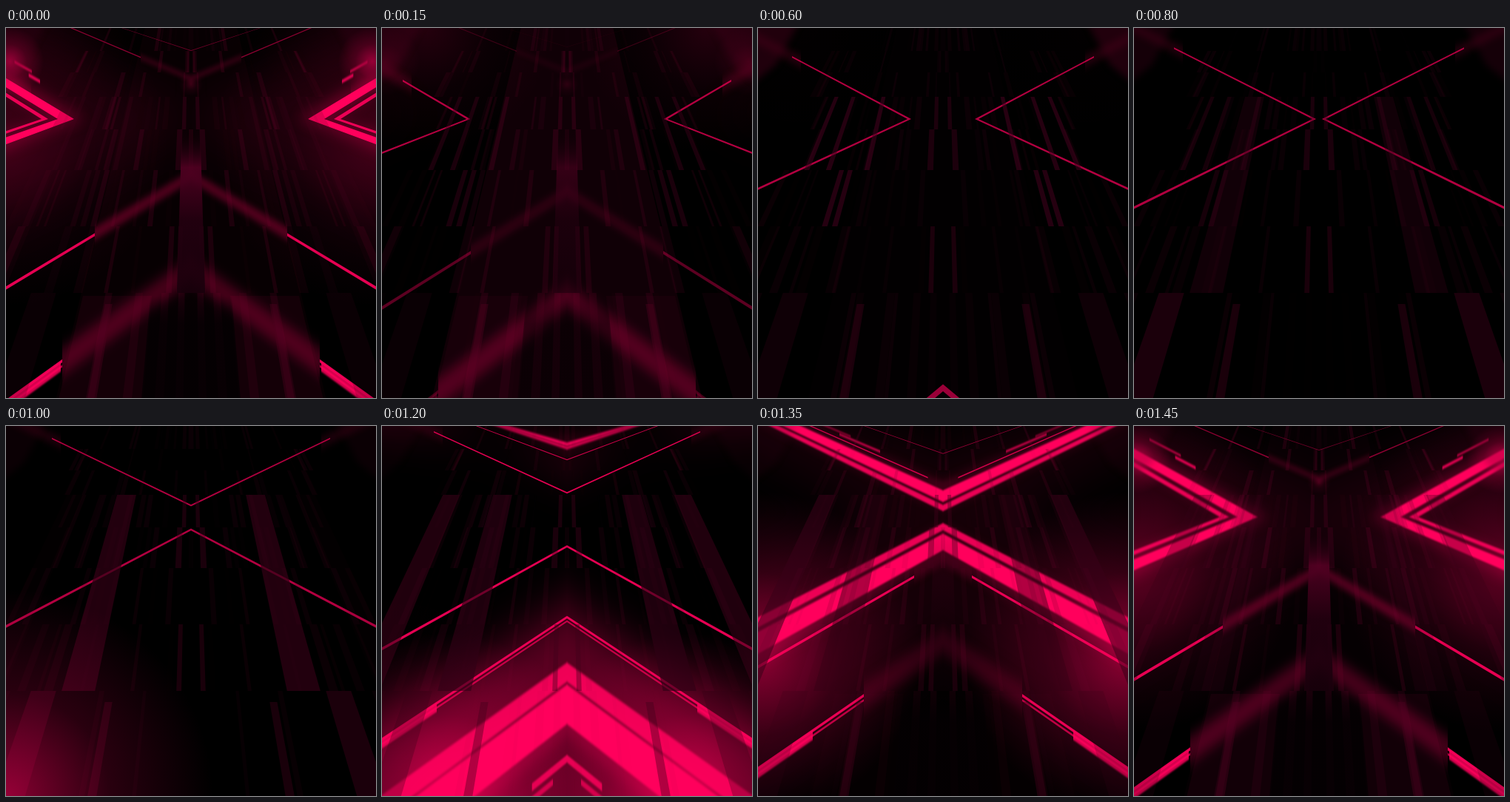
An HTML page with a canvas that plays this animation: 500x500 px, repeating every 1.5 s.

```html
<!DOCTYPE html>
<html>
<head>
<meta charset="utf-8">
<style>
html, body { margin: 0; width: 100%; height: 100%; overflow: hidden; background: #000; }
canvas { display: block; width: 100%; height: 100%; }
</style>
</head>
<body>
<canvas id="stage" width="500" height="500"></canvas>
<script>
const c = document.getElementById('stage').getContext('2d');
const LOOP = 1500, STEP = 50, HORIZON = 123, VANISH = -260, MID = 250;

const clamp = v => Math.max(0, Math.min(1, v));
const ramp = (a, b, t) => clamp((t - a) / (b - a));
const red = a => `rgba(255,0,92,${clamp(a)})`;

// Soft hump around a moment of the loop
function bump(t, peak, reach) {
  const d = Math.abs((t - peak + LOOP * 1.5) % LOOP - LOOP / 2);
  const k = clamp(1 - d / reach);
  return k * k * (3 - 2 * k);
}

// Every chevron has its tip on the horizon; its arms steepen with the tip's place
const floorSlope = a => .37 + .155 * (a - 90) / 195;
const roofSlope = a => .6 - .12 * (a - 90) / 195;
const floorY = (a, x) => HORIZON + (a - x) * floorSlope(a);
const roofY = (a, x) => HORIZON - (a - x) * roofSlope(a);

function poly(...pts) {
  c.beginPath();
  for (const [x, y] of pts) c.lineTo(x, y);
  c.closePath();
  c.fill();
}

// Band between two chevrons, limited to a side and to a range of x
function chevron(a0, a1, alpha, { side = 'both', blur = 0, from = -100, to = MID } = {}) {
  if (alpha < .01 || to <= from) return;
  c.save();
  c.beginPath();
  c.rect(from, side === 'floor' ? HORIZON : -100, to - from, side === 'both' ? 700 : side === 'floor' ? 477 : HORIZON + 100);
  c.clip();
  if (blur) c.filter = `blur(${blur}px)`;
  c.fillStyle = red(alpha);
  const x = -100;
  poly([a1, HORIZON], [x, floorY(a1, x)], [x, floorY(a0, x)],
    [a0, HORIZON], [x, roofY(a0, x)], [x, roofY(a1, x)]);
  c.restore();
}

function glow(x, y, r, alpha) {
  if (alpha < .01) return;
  const g = c.createRadialGradient(x, y, 0, x, y, r);
  g.addColorStop(0, red(alpha));
  g.addColorStop(.5, red(alpha * .3));
  g.addColorStop(1, red(0));
  c.fillStyle = g;
  c.fillRect(0, 0, 500, 500);
}

// A tile on a plane that runs to the vanishing point
function tile(u0, u1, y0, y1) {
  const x = (u, y) => MID - u * (y - VANISH);
  poly([x(u1, y0), y0], [x(u0, y0), y0], [x(u0, y1), y1], [x(u1, y1), y1]);
}

let seed = 11;
const rnd = () => (seed = seed * 16807 % 2147483647) / 2147483647;
const ROWS = [0, 31, 60, 93, 137, 192, 268, 358, 500];
const specks = [];
for (let i = 0; i < ROWS.length - 1; i++) {
  for (let n = 0; n < 10; n++) {
    specks.push({ u: rnd() * .5, w: .006 + rnd() * .014, y0: ROWS[i], y1: ROWS[i + 1], phase: rnd() });
  }
}

// Thin chevron that drifts towards the viewer for a whole loop, then fades
function drift(t) {
  const a = 90 + .195 * t;
  const out = 1 - ramp(LOOP, 1750, t);
  const settled = ramp(1320, 1420, t);
  const bright = (.7 + .2 * ramp(1000, 1200, t)) * out;
  const from = (22 + .04 * t) * (1 - settled);
  const floorEnd = MID - 130 * settled, roofEnd = MID - 68 * settled;
  chevron(a - 5, a, bright, { side: 'floor', to: floorEnd, blur: .5 });
  chevron(a - 14, a + 6, .3 * settled * out, { side: 'floor', from: floorEnd, blur: 4 });
  chevron(a - 5, a, bright * (1 - .4 * settled), { side: 'roof', from, to: roofEnd, blur: .5 });
  chevron(a - 12, a + 6, .22 * settled * out, { side: 'roof', from: roofEnd, blur: 3 });
  chevron(a - 14, a + 10, .2 * out * (1 - settled), { side: 'roof', to: from + 12, blur: 6 });
}

// Nearer pair of chevrons
function nearPair(p) {
  const a = 457 + .25 * (p - 1200);
  const settled = ramp(1270, 1400, p);
  const shown = ramp(1120, 1200, p) * (1 - ramp(1550, 1680, p));
  const back = .6 * bump(p, 2100, 150);
  const end = MID - 174 * settled;
  chevron(a - 4, a, shown * .9, { side: 'floor', to: end, blur: .5 });
  chevron(a + 3, a + 6, shown * .7, { side: 'floor', to: end });
  chevron(a - 2, a + 10, shown * .85, { side: 'floor', to: 74, blur: 1 });
  chevron(a - 18, a + 16, .26 * settled * (1 - ramp(1750, 2050, p)), { side: 'floor', from: end, blur: 8 });
  chevron(a - 4, a + 4, back, { side: 'floor', blur: .6 });
  chevron(a - 3, a + 2, shown * (.8 - .4 * settled), { side: 'roof', blur: .6 });
}

// Wide bright chevron that races away into the distance
function pulse(p) {
  const left = LOOP - p;
  const a = 92 + 1.45 * left + .0009 * left * left;
  const out = 1 - ramp(LOOP, 1720, p);
  const power = ramp(1080, 1200, p) * out;
  if (!power) return;
  const inner = a - 22 - .1 * left;
  const second = inner - 13 + .03 * left;
  const blur = .7 + .003 * Math.max(0, left);

  chevron(a - 170, a + 170, power * (.08 + .33 * ramp(200, 320, left)), { blur: 32 });
  const foot = Math.max(0, a - 377 / floorSlope(a));
  glow(foot * .7, Math.min(500, floorY(a, 0)), 220, power * Math.min(.7, .2 + .0022 * left));

  chevron(inner - 12, a + 14, power * .25, { blur: 9 });
  chevron(inner, a, power, { blur });
  chevron(second - 9 - .06 * left, second, power * .9, { blur });

  // Short strands ahead of the tip
  const side = left > 250 ? 'floor' : 'roof';
  chevron(a + 38, a + 47, power * .85, { side, from: a / 3, to: a / 2, blur: 1 });
  chevron(a + 53, a + 60, power * .7, { side, from: a / 8, to: a * .38, blur: 1 });
  glow(5, 45, 46, .65 * ramp(1390, 1450, p) * out);
}

function tiles(t, p) {
  const late = ramp(1330, 1430, p) * (1 - ramp(LOOP, 1900, p));
  const pillar = ramp(0, 480, 480 - Math.abs(t - 1080));

  for (const s of specks) {
    const wave = .5 + .5 * Math.cos(2 * Math.PI * (t / LOOP + s.phase));
    c.fillStyle = `rgba(120,0,50,${(.09 + .1 * late + .1 * bump(t, 1300, 200)) * wave})`;
    tile(s.u, s.u + s.w, s.y0, s.y1);
  }

  // Pillars, inner and outer
  c.fillStyle = `rgba(48,0,21,${pillar * .85})`;
  tile(.21, .283, 93, 358);
  c.fillStyle = `rgba(56,0,24,${.65 * bump(t, 1270, 330)})`;
  tile(.41, .475, 93, 358);
  c.fillStyle = `rgba(50,0,21,${.2 + .4 * bump(t, 900, 450)})`;
  tile(.295, .35, 358, 500);

  // Streaks beside the axis and on the walls
  c.fillStyle = 'rgba(64,0,27,.4)';
  tile(.017, .031, 93, 137);
  tile(.029, .047, 137, 192);
  tile(.021, .032, 268, 358);
  tile(.168, .184, 373, 500);
  c.fillStyle = `rgba(66,0,28,${.15 + .5 * bump(t, 450, 600)})`;
  for (const u of [.27, .296]) tile(u, u + .014, 192, 268);
  for (const u of [.22, .335, .4]) tile(u, u + .015, 93, 192);

  // Central strip
  c.fillStyle = red(.07 * bump(t, 250, 450));
  tile(0, .24, 0, 500);
  c.fillStyle = red(.05 * late);
  tile(.085, .235, 362, 500);

  // Column on the axis with a soft light in it
  const g = c.createLinearGradient(0, 140, 0, 360);
  g.addColorStop(0, `rgba(20,0,9,0)`);
  g.addColorStop(.22, `rgba(82,0,34,${.9 * late})`);
  g.addColorStop(.55, `rgba(36,0,16,${.9 * late})`);
  g.addColorStop(1, `rgba(24,0,11,${.9 * late})`);
  c.fillStyle = g;
  tile(0, .031, 140, 358);
  glow(MID, 76, 16, .2 * late);

  const dark = .8 * ramp(1230, 1300, p) * (1 - ramp(LOOP, 1800, p));
  const shade = c.createLinearGradient(0, 362, 0, 400);
  shade.addColorStop(0, 'rgba(4,0,2,0)');
  shade.addColorStop(1, `rgba(4,0,2,${dark})`);
  c.fillStyle = shade;
  tile(0, .088, 362, 500);

  // Shaded upper corner
  c.save();
  c.filter = 'blur(5px)';
  c.fillStyle = `rgba(70,0,28,${.12 + .4 * bump(t, 430, 700)})`;
  poly([-20, -20], [62, -20], [24, 50], [-20, 85]);
  c.restore();
}

function half(t) {
  const p = t < 750 ? t + LOOP : t;
  c.save();
  c.beginPath();
  c.rect(0, 0, MID, 500);
  c.clip();
  glow(60, 0, 170, .2 * bump(t, 280, 380));
  pulse(p);
  drift(t);
  drift(t + LOOP);
  nearPair(p);
  tiles(t, p);
  c.restore();
}

function draw(t) {
  c.setTransform(1, 0, 0, 1, 0, 0);
  c.fillStyle = '#000';
  c.fillRect(0, 0, 500, 500);
  half(t);
  c.setTransform(-1, 0, 0, 1, 500, 0);
  half(t);
  c.setTransform(1, 0, 0, 1, 0, 0);
  glow(0, 500, 280, .55 * bump(t, 1020, 220));
}

const begin = performance.now();
let shown = -1;
function tick() {
  const t = Math.floor((performance.now() - begin) % LOOP / STEP) * STEP;
  if (t !== shown) draw(shown = t);
  requestAnimationFrame(tick);
}
tick();
</script>
</body>
</html>
```
